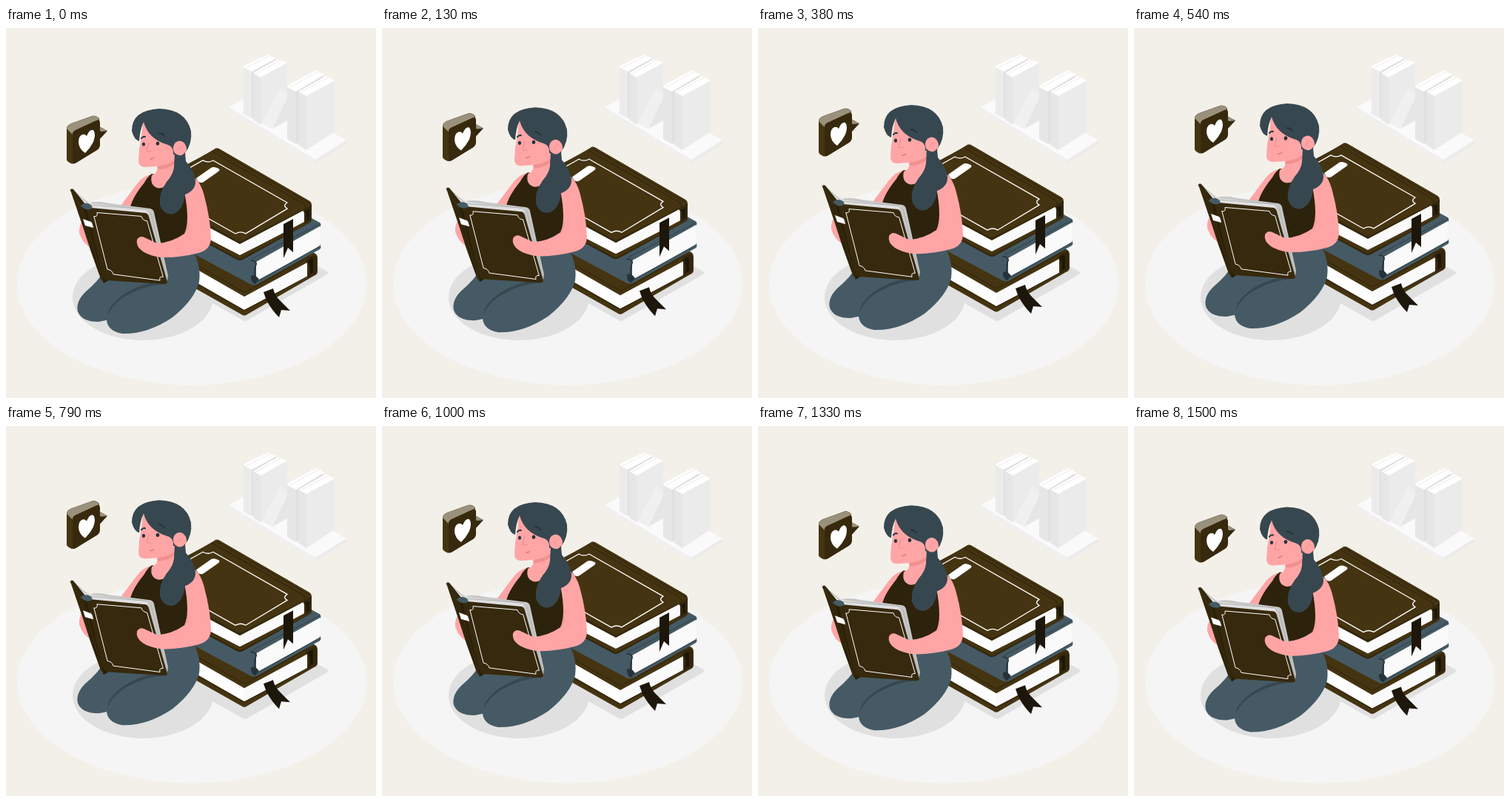
Recreate the animation shown at these times as an HTML page with a canvas. Size 500x500 px, loop 1.54 s.

```html
<!DOCTYPE html>
<html lang="en">
<head>
<meta charset="utf-8">
<title>Reading</title>
<style>
html, body { margin: 0; width: 100%; height: 100%; overflow: hidden; background: #f3f0e9; }
canvas { display: block; width: 100vmin; height: 100vmin; }
</style>
</head>
<body>
<canvas id="stage"></canvas>
<script>
const canvas = document.getElementById('stage');
const ctx = canvas.getContext('2d');
const LOOP = 1540;
const PHASE = 40;

const C = {
  bg: '#f3f0e9', floor: '#f5f5f5', shadow: '#e0e0e0',
  brown: '#453411', deep: '#33270d', dark: '#1d160a', cover: '#37290d',
  blue: '#455a64', hair: '#37474f', ink: '#263238',
  skin: '#ffa5a6', blush: '#f28f8f', white: '#fff', page: '#fafafa', edge: '#9a917d'
};

function fill(path, color) {
  ctx.fillStyle = color;
  ctx.fill(new Path2D(path));
}

function line(path, color, width = 1) {
  ctx.strokeStyle = color;
  ctx.lineWidth = width;
  ctx.lineCap = ctx.lineJoin = 'round';
  ctx.stroke(new Path2D(path));
}

function oval(x, y, rx, ry, color, angle = 0) {
  ctx.fillStyle = color;
  ctx.beginPath();
  ctx.ellipse(x, y, rx, ry, angle, 0, Math.PI * 2);
  ctx.fill();
}

// Outline of a quad whose corners are scooped inwards.
function frame(corners, notch, width) {
  const toward = (p, q) => {
    const d = Math.hypot(q[0] - p[0], q[1] - p[1]);
    return [p[0] + (q[0] - p[0]) * notch / d, p[1] + (q[1] - p[1]) * notch / d];
  };
  ctx.beginPath();
  corners.forEach((p, i) => {
    const a = toward(p, corners[(i + 3) % 4]);
    const b = toward(p, corners[(i + 1) % 4]);
    ctx.lineTo(...a);
    ctx.quadraticCurveTo(a[0] + b[0] - p[0], a[1] + b[1] - p[1], ...b);
  });
  ctx.closePath();
  ctx.strokeStyle = C.white;
  ctx.lineWidth = width;
  ctx.stroke();
}

function drawShelf() {
  fill('M301 107L343 83L460 152L418 178Z', '#fafafa');
  fill('M301 107L418 178V183L301 112Z', '#f0f0f0');
  fill('M418 178L460 152V157L418 183Z', '#ebebeb');

  fill('M332 59L365 41V100L332 122Z', '#e0e0e0');
  fill('M321 53L332 59V122L321 116Z', '#ebebeb');
  fill('M321 53Q322 50 326 49L354 36L365 41L332 59Z', C.white);
  fill('M344 67L380 47V102L344 130Z', '#ebebeb');
  fill('M334 61L344 67V130L334 124Z', '#e6e6e6');
  fill('M334 61L367 42L380 47L344 67Z', C.white);
  line('M324 54L356 38M337 62L370 44', '#e8e8e8', .8);

  fill('M345 129L370 82L384 89L360 136Z', '#f0f0f0');
  fill('M360 136L382 91V124Z', '#e6e6e6');

  fill('M392 86L428 63V136L392 157Z', '#e0e0e0');
  fill('M380 80L392 86V157L380 150Z', '#e6e6e6');
  fill('M380 80Q381 77 385 75L419 57L430 63L392 86Z', C.white);
  fill('M406 92L444 71V140L406 165Z', '#ebebeb');
  fill('M395 86L406 92V165L395 158Z', '#e6e6e6');
  fill('M395 86L432 65L444 71L406 92Z', C.white);
  line('M384 80L422 59M398 87L435 67', '#e8e8e8', .8);
}

function drawGround() {
  oval(251, 346, 236, 136.5, C.floor);
  drawShelf();
  fill('M434 329Q437 331 434 333L326 395Q323 397 320 395L240 350L350 282Z', C.shadow);
  oval(185, 364, 95, 58, C.shadow);
}

function drawLowerBook() {
  fill('M240 303L330 290L413 303Q421 304 421 311V329Q421 333 416 335L326 387Q322 390 318 387L240 343Z', C.brown);
  fill('M240 316L322 363V381L240 334Z', C.white);
  fill('M322 363L407 317V337L322 381Z', C.page);
  line('M240 310L320 356Q322 357 325 356L409 309', C.deep, 1.2);
  line('M240 336L322 382L417 331', C.deep, 1.4);
  fill('M405 314Q418 302 420 310V331L407 338Q412 326 405 314Z', C.deep);
  fill('M408 315Q414 309 415 314V330L410 333Q413 323 408 315Z', C.dark);
  fill('M348 357L361 352Q363 361 369 367L384 382L372 381L369 391Q359 381 352 368Z', C.dark);
}

function drawMiddleBook() {
  fill('M240 262L330 300L413 257L424 263Q427 266 424 269L336 317L340 341L424 292Q427 297 424 299L340 346Q334 349 328 345L240 298Z', C.blue);
  fill('M338 316L424 268V295L338 342Z', C.page);
  line('M332 312L424 265', '#35474f', 1.2);
  fill('M329 311Q338 312 339 318Q334 330 339 342L337 347Q330 345 329 338Z', C.blue);
  line('M331 314Q338 314 338 319Q334 330 338 341', C.ink, 1.6);
  fill('M331 335Q337 332 342 340L337 346Q331 345 331 335Z', C.ink);
  line('M339 343L424 295', '#35474f', 1.2);
}

function drawUpperBook() {
  fill('M284 163L409 234Q414 237 413 242V259Q413 262 409 264L320 313Q316 315 312 313L225 266V195Z', C.deep);
  fill('M225 243L316 292V307L225 260Z', C.white);
  fill('M316 292L403 246V263L316 307Z', C.page);
  line('M225 263L316 310L411 260', C.brown, 4);
  fill('M281 164Q284 161 288 163L409 233Q416 237 410 241L320 287Q316 289 312 287L190 219Z', C.brown);
  fill('M401 246L412 240V260L403 265Q407 255 401 246Z', C.deep);
  fill('M404 248L410 245V258L406 260Q408 253 404 248Z', C.dark);
  line('M279 167L403 238L405 243M285 165L410 237', C.deep, 1.3);
  frame([[273, 175], [387, 240], [317, 282], [200, 216]], 8, 1.3);
  fill('M257 203L277 189Q280 187 285 189Q291 191 287 194L267 208Q264 210 260 208Z', C.white);
  fill('M375 265L388 258V303L381 297L375 311Z', C.dark);
}

function drawBody() {
  // legs
  fill('M135 325Q125 342 107 357Q94 370 97 383Q102 397 125 397Q160 393 205 350L185 320Z', C.blue);
  fill('M190 338L205 300H252Q264 320 261 343Q255 367 225 391Q191 414 157 413Q134 409 136 389Q139 373 162 359Q184 346 209 343Z', C.blue);
  fill('M213 341Q160 349 140 379L137 389Q146 369 168 359Q188 348 213 346Z', '#37474f');

  // far arm and torso
  fill('M199 197Q185 199 176 212L152 244L180 251L205 225Z', C.skin);
  fill('M197 197Q191 201 187 209Q168 232 167 248L190 270L217 309Q237 304 242 298L247 250L241 207Z', '#2d220b');
  fill('M204 178H230L228 199Q217 219 204 216Q194 212 197 199Q205 196 205 187Z', C.skin);
  fill('M204 187Q219 185 229 178V182Q218 192 205 191Z', C.blush);
}

function drawHead() {
  fill('M185 128Q183 150 180 164L179 181Q180 188 188 188Q219 187 229 176L237 140L207 123Z', C.skin);
  fill('M180 153Q173 151 170 139Q170 111 207 109Q243 110 250 139Q252 156 242 169L226 171Q227 159 216 157Q192 149 186 127Q181 137 180 153Z', C.hair);
  oval(235, 163, 9, 10.5, C.skin, -.2);
  line('M232 166Q234 159 239 160', C.blush, .9);

  oval(186, 157, 2.1, 2.6, C.ink);
  oval(205, 156, 2.3, 2.6, C.ink);
  line('M183 149Q185 146 188 147', C.ink, 2);
  line('M207 142Q211 142 214 146', C.ink, 2);
  line('M193 155L190 166Q192 168 196 166', '#ed8589', 1);
  line('M195 177Q198 178 200 175', '#c95862', 1);
}

function drawPonytail() {
  fill('M228 169L227 188Q226 198 217 208Q206 223 208 239Q213 254 227 251Q240 245 242 225Q257 219 256 206Q254 192 243 180L242 168Q236 176 228 169Z', C.hair);
}

function drawHeldBook() {
  fill('M105 259Q98 266 99 277Q103 290 113 296L120 272Z', C.skin);
  // pages
  fill('M91 217Q101 230 113 236Q124 233 140 237L195 244Q199 245 200 249L219 335L217 345L112 248Z', '#c7c7c7');
  fill('M92 218Q101 232 116 237L190 246L193 252L110 246Z', '#e0e0e0');
  line('M94 222L113 239L190 245M196 250L218 339', '#a9a9a9', .8);
  // covers
  fill('M87 219Q88 216 91 218L112 244L137 341Q132 346 128 339L114 300L104 269Z', C.deep);
  fill('M102 242L112 245L140 340L132 345L121 317Z', '#292008');
  fill('M109 245Q110 243 115 243L189 250Q192 251 193 255L218 343Q218 346 214 346L136 341Q131 338 129 329Z', C.cover);
  fill('M101 240Q106 235 113 238Q118 241 116 244Q107 248 101 240Z', C.blue);
  line('M87 219L104 246L131 342', C.brown, 1);
  frame([[117, 249], [189, 255], [214, 342], [139, 332]], 6, 1);
  fill('M104 258L115 262Q117 264 118 270L107 267Z', C.white);
}

function drawNearArm() {
  fill('M250 200Q262 204 268 227Q276 257 277 283Q277 300 260 304Q233 311 209 310Q192 307 185 302Q175 295 177 286Q181 280 187 283L204 291Q224 290 241 278Q249 262 241 221Q256 214 250 200Z', C.skin);
  line('M246 264Q247 274 241 279', C.blush, .8);
}

function drawBubble() {
  fill('M126 133L137 139L126 151Z', C.deep);
  fill('M124 132L137 139L129 140L124 138Z', C.edge);
  fill('M82 135Q83 131 88 129L116 119Q121 117 126 122V159Q126 163 122 165L95 182Q90 185 86 182Q81 180 82 175Z', C.brown);
  fill('M82 136Q83 131 88 129L117 119Q121 118 126 122Q126 124 123 125L94 138Q90 140 90 144Z', C.edge);
  fill('M90 143Q90 140 94 138L122 125Q127 123 127 128V158Q127 162 123 165L95 182Q90 185 90 179Z', C.cover);
  fill('M109 146Q113 136 118 138Q122 143 118 154Q114 162 107 169Q99 164 98 155Q98 146 103 144Q107 143 109 146Z', C.white);
}

const girl = [drawBody, drawHead, drawHeldBook, drawNearArm, drawPonytail];
const stack = [drawLowerBook, drawMiddleBook, drawUpperBook];

function lifted(dy, parts) {
  ctx.save();
  ctx.translate(0, dy);
  parts.forEach(draw => draw());
  ctx.restore();
}

// Straight rise and fall, measured from the pose at time zero.
function rise(time) {
  const wave = t => 1 - Math.abs(((t + PHASE) % LOOP) / (LOOP / 2) - 1);
  return wave(time) - wave(0);
}

function resize() {
  const size = Math.min(innerWidth, innerHeight) * devicePixelRatio;
  canvas.width = canvas.height = Math.round(size);
}

const start = performance.now();

function render() {
  const up = rise(Math.max(0, performance.now() - start) % LOOP);
  const scale = canvas.width / 500;
  ctx.setTransform(scale, 0, 0, scale, 0, 0);
  ctx.fillStyle = C.bg;
  ctx.fillRect(0, 0, 500, 500);
  drawGround();
  lifted(-10 * up, [...stack, ...girl]);
  lifted(-20 * up, [drawBubble]);
  requestAnimationFrame(render);
}

addEventListener('resize', resize);
resize();
render();
</script>
</body>
</html>
```
